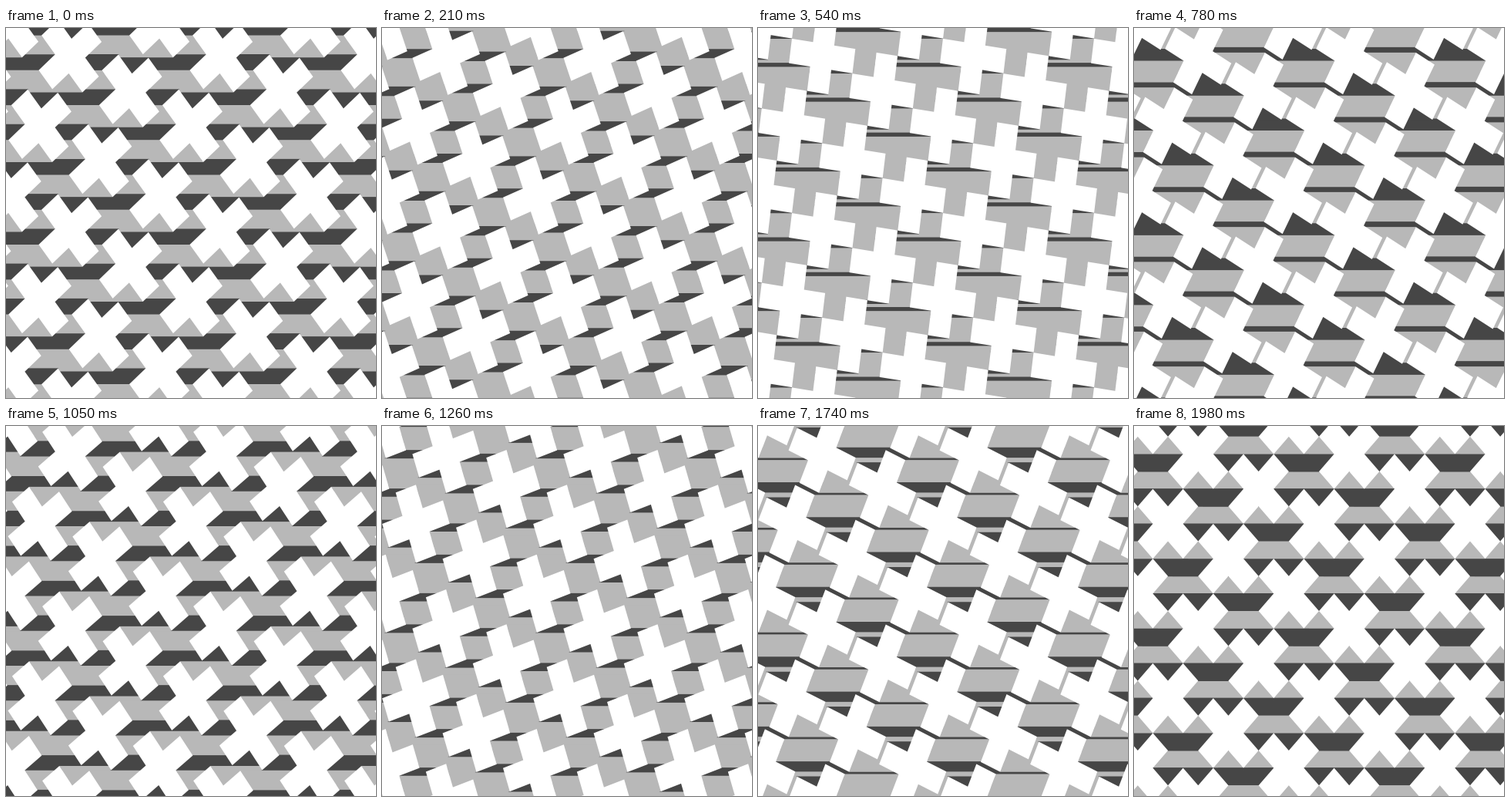
These frames come from a looping animation (480x480 px, 2010 ms). An HTML page with a canvas:

```html
<!DOCTYPE html>
<html>
<head>
<meta charset="utf-8">
<style>
html, body { margin: 0; width: 100%; height: 100%; overflow: hidden; background: #b8b8b8; }
canvas { display: block; width: 480px; height: 480px; }
</style>
</head>
<body>
<canvas id="stage" width="960" height="960"></canvas>
<script>
const ctx = document.getElementById('stage').getContext('2d');
const LIGHT = '#b8b8b8', DARK = '#464646';
const SIZE = 480, MARGIN = 130, DEPTH = 150;
const ARM = 32, SPACING = ARM * Math.SQRT2, SQUASH = Math.cos(Math.PI / 6);
const STEP_MS = 30, STEPS = 67, TURN = 68;

// Outline of a plus in half arm widths, clockwise.
const quarter = [[1, -3], [1, -1], [3, -1]];
const outline = [];
for (let q = 0, pts = quarter; q < 4; q++) {
  outline.push(...pts);
  pts = pts.map(([x, y]) => [-y, x]);
}
// Consecutive quarters join without repeating a corner.
const plus = outline.filter((p, i) => i === 0 || p + '' !== outline[i - 1] + '');

const centers = [];
for (let i = -12; i <= 12; i++) {
  for (let j = -12; j <= 12; j++) {
    const x = 240 + (2 * i - j) * SPACING * SQUASH;
    const y = 240 + (i + 2 * j - 2.5) * SPACING;
    if (x > -MARGIN && x < SIZE + MARGIN && y > -60 && y < SIZE + 60) centers.push([x, y]);
  }
}

function trace(points) {
  ctx.beginPath();
  points.forEach(([x, y], i) => i ? ctx.lineTo(x, y) : ctx.moveTo(x, y));
  ctx.closePath();
}

function wall(a, b, dark) {
  return { a, b, dark, top: Math.min(a[1], b[1]), bottom: Math.max(a[1], b[1]), done: false };
}

function xAt(w, y) {
  return w.a[0] + (w.b[0] - w.a[0]) * (y - w.a[1]) / (w.b[1] - w.a[1]);
}

// Farther walls come first: a wall hides whatever lies behind it in a shared row.
function sortWalls(walls, side) {
  const sorted = [];
  function visit(w) {
    if (w.done) return;
    w.done = true;
    for (const v of walls) {
      if (v.done) continue;
      const top = Math.max(w.top, v.top), bottom = Math.min(w.bottom, v.bottom);
      if (bottom - top < 1e-4) continue;
      const y = (top + bottom) / 2;
      if (side * (xAt(v, y) - xAt(w, y)) < 0) visit(v);
    }
    sorted.push(w);
  }
  walls.forEach(visit);
  return sorted;
}

function draw(step) {
  const n = (step + 2) % TURN, half = TURN / 2;
  const side = n < half ? -1 : 1;
  const angle = ((n % half) / half - 0.5) * Math.PI / 2;
  const c = Math.cos(angle), s = Math.sin(angle), r = ARM / 2;
  const shape = plus.map(([x, y]) => [(x * c - y * s) * r * SQUASH, (x * s + y * c) * r]);
  const shapes = centers.map(([x, y]) => shape.map(p => [x + p[0], y + p[1]]));

  const walls = [];
  for (const pts of shapes) {
    pts.forEach((a, i) => {
      const k = (i + 1) % pts.length, b = pts[k];
      if (side * (b[1] - a[1]) > -1e-6) walls.push(wall(a, b, plus[i][1] === plus[k][1]));
    });
  }

  ctx.setTransform(2, 0, 0, 2, 0, 0);
  ctx.fillStyle = LIGHT;
  ctx.fillRect(0, 0, SIZE, SIZE);
  ctx.strokeStyle = DARK;
  ctx.lineWidth = 0.8;
  for (const { a, b, dark } of sortWalls(walls, side)) {
    const shift = side * DEPTH;
    trace([a, b, [b[0] + shift, b[1]], [a[0] + shift, a[1]]]);
    ctx.fillStyle = dark ? DARK : LIGHT;
    ctx.fill();
    if (dark) ctx.stroke();
  }
  ctx.fillStyle = '#fff';
  for (const pts of shapes) {
    trace(pts);
    ctx.fill();
  }
}

const start = performance.now();
let shown = -1;
function tick() {
  const step = Math.floor((performance.now() - start) / STEP_MS) % STEPS;
  if (step !== shown) draw(shown = step);
  requestAnimationFrame(tick);
}
tick();
</script>
</body>
</html>
```
